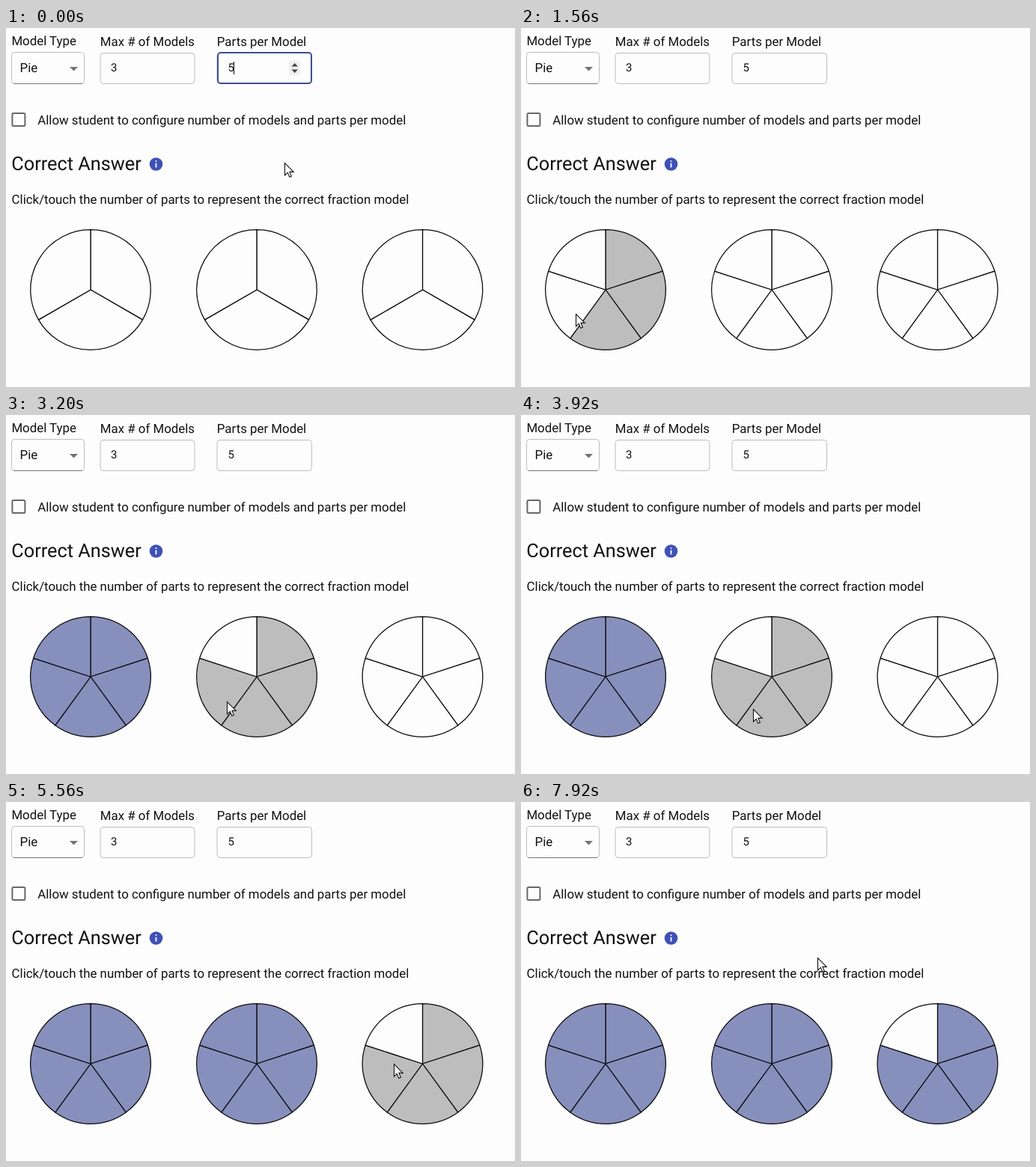
An HTML page for the animation above (8 s loop, 680x480 px).

```html
<!DOCTYPE html>
<html lang="en">
<head>
<meta charset="utf-8">
<title>Fraction model</title>
<style>
  html, body { margin: 0; width: 100%; height: 100%; overflow: hidden; background: #fdfdfd; }
  svg { display: block; width: 680px; height: 480px; }
  text { font: 16.87px Roboto, sans-serif; fill: #111; text-rendering: geometricPrecision; }
  .heading { font-size: 25.3px; }
  .value { font-size: 15px; }
  .box { fill: #fdfdfd; stroke: #bdbdbd; }
  .wedge { stroke: #0a0a0a; stroke-width: 1.25; stroke-linejoin: round; }
</style>
</head>
<body>
<svg viewBox="0 0 680 480">
  <text x="7.4" y="23">Model Type</text>
  <text x="125.8" y="24">Max # of Models</text>
  <text x="281.8" y="24">Parts per Model</text>

  <rect class="box" x="7.5" y="32.5" width="97" height="42" rx="4"/>
  <path d="M10 74.5H102" stroke="#777"/>
  <text x="18.5" y="59">Pie</text>
  <path d="M85 52H96L90.5 57.5Z" fill="#737373"/>

  <rect class="box" x="126" y="33.5" width="126" height="41" rx="4"/>
  <text class="value" x="140" y="58">3</text>
  <rect class="box" x="282" y="33.5" width="126.5" height="41" rx="4"/>
  <text class="value" x="296.5" y="58">5</text>

  <g id="focus">
    <rect x="283" y="33" width="125" height="41" rx="4" fill="none" stroke="#3c4d98" stroke-width="2"/>
    <path d="M304.5 45V62" stroke="#111"/>
    <rect x="378" y="44" width="15" height="19" fill="#eee"/>
    <path d="M381.5 51.5L385.7 47L390 51.5ZM381.5 55.5H390L385.7 60Z" fill="#444"/>
  </g>

  <rect x="8.4" y="114" width="17" height="17" rx="1.5" fill="#fdfdfd" stroke="#686868" stroke-width="2"/>
  <text x="42.2" y="129">Allow student to configure number of models and parts per model</text>

  <text class="heading" x="7.3" y="190">Correct Answer</text>
  <circle cx="200.5" cy="182" r="8.8" fill="#3f51b5"/>
  <path d="M199.6 177.2h1.800v1.800h-1.800zM199.600 180.800h1.800v5.600h-1.800z" fill="#fff"/>
  <text x="7.6" y="234.6">Click/touch the number of parts to represent the correct fraction model</text>

  <g id="pies"></g>
  <path id="cursor" d="M.5 .5V17L4.3 13.4L6.8 19.3L9.4 18.2L6.9 12.4H12.2Z" fill="#fff" stroke="#111" stroke-width="1.1"/>
</svg>
<script>
const LOOP = 8000, STEP = 40, HOVER_LAG = 40;
const BLUR_AT = 40, SPLIT_AT = 80;
const RADIUS = 80.3, CENTER_Y = 350;
const EMPTY = '#fdfdfd', HOVER = '#bdbdbd', CHOSEN = '#878fbd';

const pies = [
  { x: 113, clickAt: 1900, count: 5 },
  { x: 335, clickAt: 4900, count: 5 },
  { x: 556.5, clickAt: 7400, count: 4 },
];

// A point of a pie, by clockwise turns from the top and distance from the center
function onPie(pie, turn, radius) {
  const angle = 2 * Math.PI * turn;
  return { pie, turn, radius,
    x: pie.x + radius * Math.sin(angle), y: CENTER_Y - radius * Math.cos(angle) };
}

const [first, second, third] = pies;
const rest = { x: 372, y: 180 };
const moves = [
  { from: 40, until: 520, to: { x: 118, y: 250 } },
  { from: 640, until: 760, to: onPie(first, -.02, 59) },
  { from: 760, until: 1480, to: onPie(first, .58, 54) },
  { from: 1480, until: 1760, to: onPie(first, .9, 42) },
  { from: 2080, until: 2560, to: onPie(second, .25, 32) },
  { from: 2560, until: 2920, to: onPie(second, .55, 52) },
  { from: 2920, until: 3760, to: onPie(second, .9, 52) },
  { from: 3760, until: 3920, to: onPie(second, .584, 50) },
  { from: 3920, until: 4240, to: onPie(second, .48, 54) },
  { from: 4240, until: 4800, to: onPie(second, .92, 54) },
  { from: 5000, until: 5840, to: onPie(third, .32, 38) },
  { from: 5840, until: 6040, to: onPie(third, .45, 50) },
  { from: 6240, until: 6560, to: onPie(third, .305, 50) },
  { from: 6960, until: 7320, to: onPie(third, .7, 50) },
  { from: 7440, until: 7920, to: { x: 396, y: 208 } },
];

const mix = (a, b, u) => a + (b - a) * u;
const smooth = u => u * u * (3 - 2 * u);

// Within a pie the pointer circles its center; elsewhere it goes straight.
function pointerAt(time) {
  const i = moves.findLastIndex(move => move.from <= time);
  if (i < 0) return rest;
  const { from, until, to } = moves[i];
  const start = i ? moves[i - 1].to : rest;
  const u = smooth(Math.min(1, (time - from) / (until - from)));
  return to.pie && to.pie === start.pie
    ? onPie(to.pie, mix(start.turn, to.turn, u), mix(start.radius, to.radius, u))
    : { x: mix(start.x, to.x, u), y: mix(start.y, to.y, u) };
}

function wedgePath(pie, index, parts) {
  const a = onPie(pie, index / parts, RADIUS), b = onPie(pie, (index + 1) / parts, RADIUS);
  return `M${pie.x} ${CENTER_Y}L${a.x} ${a.y}A${RADIUS} ${RADIUS} 0 0 1 ${b.x} ${b.y}Z`;
}

function hoveredParts(pie, { x, y }, parts) {
  const dx = x - pie.x, dy = y - CENTER_Y;
  if (Math.hypot(dx, dy) > RADIUS) return 0;
  const turn = Math.atan2(dx, -dy) / (2 * Math.PI);
  return Math.floor((turn + 1) % 1 * parts) + 1;
}

const byId = id => document.getElementById(id);
const make = (tag, parent) =>
  parent.appendChild(document.createElementNS('http://www.w3.org/2000/svg', tag));

for (const pie of pies) {
  pie.models = [3, 5].map(parts => {
    const group = make('g', byId('pies'));
    const wedges = Array.from({ length: parts }, (_, i) => {
      const wedge = make('path', group);
      wedge.setAttribute('class', 'wedge');
      wedge.setAttribute('d', wedgePath(pie, i, parts));
      return wedge;
    });
    return { parts, group, wedges };
  });
}

function draw(time) {
  const t = Math.floor(time % LOOP / STEP) * STEP;
  const parts = t < SPLIT_AT ? 3 : 5;
  const pointer = pointerAt(t), hoverPoint = pointerAt(t - HOVER_LAG);
  byId('focus').style.display = t < BLUR_AT ? '' : 'none';
  byId('cursor').setAttribute('transform',
    `translate(${Math.round(pointer.x)} ${Math.round(pointer.y)})`);
  for (const pie of pies) {
    const hovered = hoveredParts(pie, hoverPoint, parts);
    const filled = hovered || (t >= pie.clickAt ? pie.count : 0);
    const color = hovered ? HOVER : CHOSEN;
    for (const model of pie.models) {
      model.group.style.display = model.parts === parts ? '' : 'none';
      model.wedges.forEach((wedge, i) => wedge.setAttribute('fill', i < filled ? color : EMPTY));
    }
  }
}

const start = performance.now();
function tick() {
  draw(performance.now() - start);
  requestAnimationFrame(tick);
}
tick();
</script>
</body>
</html>
```
